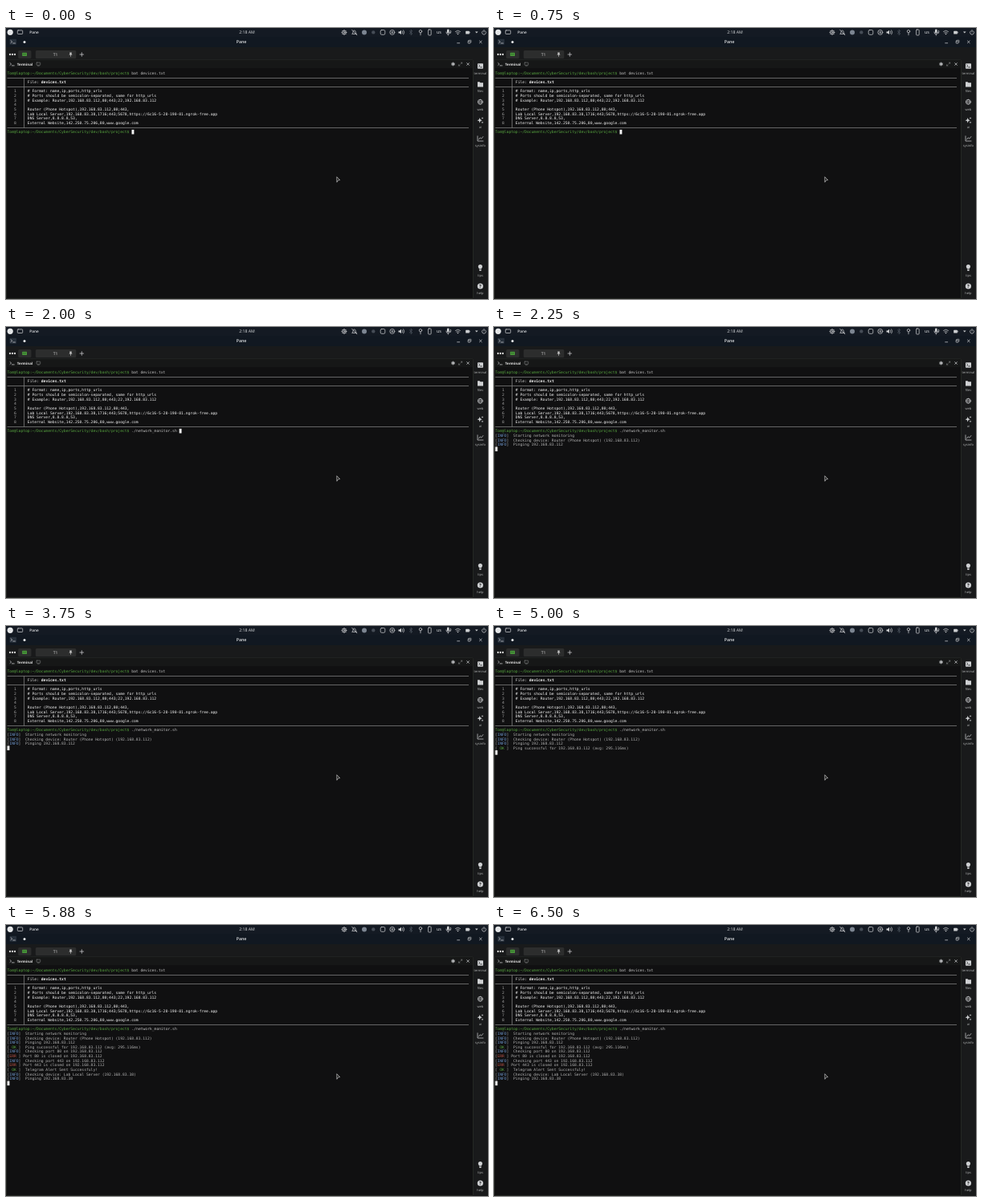
An HTML page that plays this animation: 600 by 338 pixels, repeating every 8000 ms.

```html
<!DOCTYPE html>
<html lang="en">
<head>
<meta charset="utf-8">
<title>Terminal</title>
<style>
html, body { margin: 0; width: 100%; height: 100%; overflow: hidden; background: #101011; }
svg { display: block; width: 100vw; height: 100vh; }
text { white-space: pre; text-rendering: geometricPrecision; font-family: "Open Sans", "Noto Sans", sans-serif; }
.mono text { font: 4.681px "DejaVu Sans Mono", monospace; }
.line { fill: none; stroke: #c8cacc; stroke-width: .75; stroke-linecap: round; stroke-linejoin: round; }
</style>
</head>
<body>
<svg id="stage" viewBox="0 0 600 338">
  <g id="chrome"></g>
  <g id="file" class="mono"></g>
  <g id="log" class="mono"></g>
  <rect id="caret" width="2.9" height="5.6" fill="#f4f4f4"/>
  <path d="M411.8 185.7l3.8 3.9-2.2.3-1.5 2.4z" fill="#111" stroke="#d0d0d0" stroke-width=".7" stroke-linejoin="round"/>
</svg>
<script>
const LOOP = 8000, LEFT = 1.5, TOP = 53.55, COL = 2.818, ROW = 5.64, PROMPT_ROW = 13;
const GREEN = '#58a640', BLUE = '#7099d0', RED = '#bd5446', PALE = '#cfd1d3', DIM = '#b4b4b4', INPUT = '#c4c4c4';
const PROMPT = 'Tom@laptop:~/Documents/CyberSecurity/dev/bash/project$ ';
const COMMAND = './network_monitor.sh ';
const $ = id => document.getElementById(id);

function add(parent, tag, attrs, content) {
  const el = document.createElementNS('http://www.w3.org/2000/svg', tag);
  for (const key in attrs) el.setAttribute(key, attrs[key]);
  if (content !== undefined) el.textContent = content;
  parent.appendChild(el);
  return el;
}

const chrome = $('chrome');
const box = (x, y, width, height, fill, rx = 0) => add(chrome, 'rect', { x, y, width, height, fill, rx });
const dot = (cx, cy, r, fill) => add(chrome, 'circle', { cx, cy, r, fill });
const line = (d, attrs = {}) => add(chrome, 'path', { d, class: 'line', ...attrs });
const shape = (d, fill = PALE) => add(chrome, 'path', { d, fill });
const ring = (cx, cy, r) => add(chrome, 'circle', { cx, cy, r, class: 'line' });
const frame = (x, y, width, height, rx = .8) => add(chrome, 'rect', { x, y, width, height, rx, class: 'line' });
const label = (x, y, str, size, fill, weight = 400, anchor = 'middle') =>
  add(chrome, 'text', { x, y, fill, 'font-size': size, 'font-weight': weight, 'text-anchor': anchor }, str);
const cross = (x, y, r) => line(`M${x - r} ${y - r}l${2 * r} ${2 * r}m0 ${-2 * r}l${-2 * r} ${2 * r}`);

function gear(x, y, r) {
  ring(x, y, r);
  ring(x, y, r * .4);
  for (let i = 0; i < 8; i++) {
    const c = Math.cos(i * Math.PI / 4), s = Math.sin(i * Math.PI / 4);
    line(`M${x + c * r} ${y + s * r}L${x + c * (r + .7)} ${y + s * (r + .7)}`);
  }
}

function drawDesktopBar() {
  box(0, 0, 600, 11, '#141a23');
  dot(5.2, 5.3, 3.6, '#e4e6e8');
  frame(14.3, 2.9, 6.4, 4.6);
  label(29.3, 7.2, 'Pane', 4.7, '#e2e4e6', 600, 'start');
  label(300, 7.4, '2:18 AM', 5.2, '#dcdee0');

  gear(421, 5.5, 2.4);
  line('M431 7.2q1.1-1 1-2.4 .3-1.8 1.6-1.8t1.6 1.8q-.1 1.4 1 2.4zM430.6 2.2l6.2 6.6');
  dot(446, 5.4, 3, '#7c8591');
  dot(457.3, 5.4, 2.2, '#454c56');
  frame(466.2, 2.5, 5.6, 5.8, 1.4);
  ring(480.8, 5.4, 3);
  line('M480 4.2v2.4m1.6-2.4v2.4');
  shape('M488.5 4.4h1.5l2-1.7v5.4l-2-1.7h-1.5z');
  line('M493.4 4q1 1.4 0 2.8m1.4-4q2 2.6 0 5.2');
  line('M502.4 3.8l3.4 3.2-1.7 1.6V2.2l1.7 1.6-3.4 3.2', { style: 'stroke:#505862' });
  ring(516, 4.2, 1.7);
  line('M516 6v2.8');
  frame(525.6, 2, 3.6, 7);
  label(539, 7.4, 'us', 5.6, '#e2e4e6');
  box(549, 1.5, 2.6, 5, PALE, 1.3);
  line('M547.9 5q0 2.8 2.4 2.8t2.4-2.8M550.3 7.8v1.4m3.2-6q1 1.6 0 3.2');
  line('M559.5 4.4q3-2.6 6 0m-4.8 1.6q1.8-1.6 3.6 0');
  dot(562.5, 7.5, .8, PALE);
  box(572.2, 3.7, 4.6, 3.8, PALE, .6);
  box(576.9, 4.7, .7, 1.7, PALE);
  shape('M584 4.6h3.6l-1.8 2z');
  line('M593.3 3.8a2.5 2.5 0 1 0 3.4 0M595 2.5v2.6');
}

function drawWindow() {
  box(0, 11, 600, 13, '#111821');
  box(4.5, 13.8, 8.6, 7, '#27303b', 1);
  line('M6 15.7l1.7 1.5L6 18.7m2.7.3h2.7');
  dot(23, 17.4, 1.5, '#e8eaec');
  label(293, 19.4, 'Pane', 5.3, '#e0e2e4', 600);
  line('M561.7 18.8h3');
  frame(575.2, 16.2, 2.8, 2.8, .2);
  line('M576.5 15.2h2.5v2.6', { style: 'stroke-width:.5' });
  cross(590.8, 17.4, 1.4);

  box(0, 24, 600, 314, '#191a1b');
  for (let i = 0; i < 3; i++) dot(5 + i * 3, 33, 1.15, '#d8d8d8');
  box(15.2, 28, 16.2, 10, '#2c2d2d', 1.5);
  box(20.2, 30.8, 5.8, 4.3, '#4a9a3a', .5);
  shape('M21.2 31.8h1.6v.9h-1.6zM23.4 31.8h1.6v.9h-1.6zM21.2 33.4h3.8v.7h-3.8z', '#35702f');
  box(36.8, 28, 50.5, 10, '#2c2d2d', 1.5);
  label(61.5, 34.9, 'T1', 5, '#dedede');
  shape('M79 30.4h3l-.4.6v1.3l1 1.1h-4.2l1-1.1V31zM80.2 33.5h.7v2.3h-.7z', '#c4c4c4');
  line('M92 33h4.6M94.3 30.7v4.6');

  add(chrome, 'rect', { x: .5, y: 40, width: 581, height: 297.4, rx: 1, fill: '#101011', stroke: '#2d322c', 'stroke-width': .7 });
  box(.9, 40.4, 580.2, 9.6, '#161717');
  line('M5 43.6l1.6 1.4L5 46.4m2.4.5h2.8');
  label(13.8, 46.8, 'Terminal', 4.4, '#e6e6e6', 700, 'start');
  frame(38, 43.1, 4.7, 3.2, .4).style.stroke = '#6c6e6e';
  line('M39.5 47.2h1.8', { style: 'stroke:#6c6e6e' });
  gear(556.5, 45, 1.3);
  line('M566.3 44.5l1.4-1.4m-1.3 0h1.3v1.3M565 45.7l-1.4 1.4m1.3 0h-1.3v-1.3', { style: 'stroke:#858787;stroke-width:.6' });
  cross(575.1, 45, 1.4);
}

function drawSidebar() {
  const items = [['terminal', 57.5], ['files', 80], ['web', 102.5], ['ai', 125], ['sysinfo', 147.5], ['tips', 309.5], ['help', 332]];
  for (const [str, y] of items) label(590.4, y, str, 4, '#b4b6b6');
  box(587, 44.3, 7, 6.4, PALE, .8);
  line('M588.5 46l1.4 1.3-1.4 1.3m2 .3h2', { style: 'stroke:#191a1b' });
  shape('M587 67.2h2.6l.9 1h3.5v5.2h-7z');
  ring(590.4, 92.2, 3);
  line('M587.4 92.2h6M590.4 89.2q-3 3 0 6q3-3 0-6', { style: 'stroke-width:.6' });
  shape('M589.7 112l.9 2.3 2.3.9-2.3.9-.9 2.3-.9-2.3-2.3-.9 2.3-.9zM593 111l.4 1 1 .4-1 .4-.4 1-.4-1-1-.4 1-.4zM593 116.4l.4 1 1 .4-1 .4-.4 1-.4-1-1-.4 1-.4z');
  line('M587 134.8v6.2h7M588.5 139l1.7-2.2 1.5 1.3 2.2-2.6');
  shape('M589 300.6c0-1.2-1.2-1.5-1.2-2.9a2.6 2.6 0 0 1 5.2 0c0 1.4-1.2 1.7-1.2 2.9zM589.1 301.2h2.6v1.2l-.7.6h-1.2l-.7-.6z');
  dot(590.4, 322, 3.6, PALE);
  label(590.4, 324.1, '?', 5.6, '#191a1b', 700);
}

// Each run is [text, fill, weight].
function write(parent, row, col, ...runs) {
  const el = add(parent, 'text', { x: LEFT + col * COL, y: TOP + 4.35 + row * ROW });
  for (const [str, fill, weight = 400] of runs) {
    add(el, 'tspan', { style: `fill:${fill};font-weight:${weight}` }, str);
  }
  return el;
}

function drawFile() {
  const file = $('file');
  const ruleY = row => Math.round(TOP + (row + .5) * ROW) + .5;
  const barX = Math.floor(LEFT + 7.5 * COL) + .5;
  const rules = [1, 3, 12].map(row => `M${LEFT} ${ruleY(row)}H576`).join('');
  add(file, 'path', { d: `${rules}M${barX} ${ruleY(1)}V${ruleY(12)}`, stroke: '#7c7c7c', 'stroke-width': .8, fill: 'none' });
  write(file, 0, 0, [PROMPT, GREEN], ['bat devices.txt', INPUT]);
  write(file, 2, 9, ['File: ', '#dcdcdc'], ['devices.txt', '#f0f0f0', 700]);
  const rows = [
    '# Format: name,ip,ports,http_urls',
    '# Ports should be semicolon-separated, same for http_urls',
    '# Example: Router,192.168.83.112,80;443;22,192.168.83.112',
    '',
    'Router (Phone Hotspot),192.168.83.112,80;443,',
    'Lab Local Server,192.168.83.38,1716;443;5678,https://6c16-5-28-190-81.ngrok-free.app',
    'DNS Server,8.8.8.8,53,',
    'External Website,142.250.75.206,80,www.google.com'
  ];
  rows.forEach((str, i) => {
    write(file, 4 + i, 3, [String(i + 1), '#a8a8a8']);
    write(file, 4 + i, 9, [str, '#f4f4f4']);
  });
  write(file, PROMPT_ROW, 0, [PROMPT, GREEN]);
}

const TAGS = { INFO: BLUE, ' OK ': GREEN, 'ERR ': RED };
const LOG = [
  [2130, 'INFO', ' Starting network monitoring'],
  [2130, 'INFO', ' Checking device: Router (Phone Hotspot) (192.168.83.112)'],
  [2130, 'INFO', ' Pinging 192.168.83.112'],
  [5000, ' OK ', ' Ping successful for 192.168.83.112 (avg: 295.116ms)'],
  [5130, 'INFO', ' Checking port 80 on 192.168.83.112'],
  [5130, 'ERR ', 'Port 80 is closed on 192.168.83.112'],
  [5130, 'INFO', ' Checking port 443 on 192.168.83.112'],
  [5130, 'ERR ', 'Port 443 is closed on 192.168.83.112'],
  [5750, ' OK ', ' Telegram Alert Sent Successfuly!'],
  [5880, 'INFO', ' Checking device: Lab Local Server (192.168.83.38)'],
  [5880, 'INFO', ' Pinging 192.168.83.38']
];
const TYPING = [[1000, 2], [1130, 3], [1250, COMMAND.length]];

drawDesktopBar();
drawWindow();
drawSidebar();
drawFile();
const typed = write($('log'), PROMPT_ROW, PROMPT.length, ['', INPUT]).firstChild;
const logRows = LOG.map(([, tag, str], i) =>
  write($('log'), PROMPT_ROW + 1 + i, 0, ['[', DIM], [tag, TAGS[tag]], ['] ' + str, DIM]));

function render(t) {
  let count = 0, shown = 0;
  for (const [at, n] of TYPING) if (t >= at) count = n;
  LOG.forEach(([at], i) => {
    const on = t >= at;
    logRows[i].style.display = on ? '' : 'none';
    if (on) shown++;
  });
  typed.textContent = COMMAND.slice(0, count);
  const col = shown ? 0 : PROMPT.length + count;
  const row = shown ? PROMPT_ROW + 1 + shown : PROMPT_ROW;
  $('caret').setAttribute('x', LEFT + col * COL);
  $('caret').setAttribute('y', TOP + row * ROW);
}

const start = performance.now();
function tick() {
  render((performance.now() - start) % LOOP);
  requestAnimationFrame(tick);
}
tick();
</script>
</body>
</html>
```
